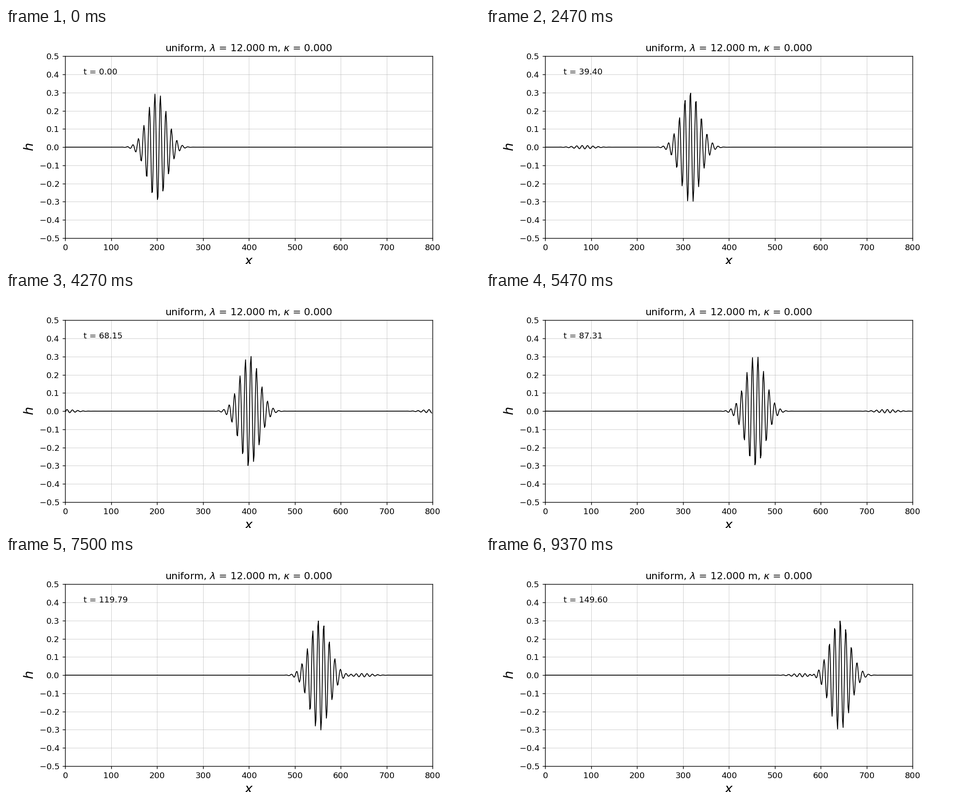
A matplotlib script that plays this animation: 1058x529 px, repeating every 9.41 s.

```python
import numpy as np
import matplotlib.pyplot as plt
from matplotlib.animation import FuncAnimation

LOOP_MS = 9410
SLOTS = 314
SLOT_MS = LOOP_MS / SLOTS

# The wave advances 30 times a second, on a clock of 10 ms
starts = 10 * np.round(np.arange(282) * 10 / 3)

# Periodic domain, values stored at cell centres
LENGTH, CELLS = 800, 600
DX = LENGTH / CELLS
x = (np.arange(CELLS) + 0.5) * DX

# Wave packet
WAVELENGTH, AMPLITUDE = 12.0, 0.3
CENTRE, WIDTH, SHIFT = 200, 30, 0.2
packet = (AMPLITUDE * np.sin(2 * np.pi * (x - SHIFT) / WAVELENGTH)
          * np.exp(-((x - CENTRE) / WIDTH) ** 2))

# Leapfrog scheme on a staggered grid, five steps per picture
C0 = np.sqrt(9.8)        # long-wave speed for unit depth
COURANT = 0.25
DT = COURANT * DX / C0
STEP = 5 * DT

# Its numerical dispersion; excess velocity sends a weak wave to the left
half = np.pi * np.fft.rfftfreq(CELLS)
omega = 2 / DT * np.arcsin(COURANT * np.sin(half))
excess = 1 / np.maximum(np.cos(half), 0.5)
spectrum = np.fft.rfft(packet)
right = spectrum * (1 + excess) / 2
left = spectrum * (1 - excess) / 2


def surface(t):
    turn = np.exp(1j * omega * t)
    return np.fft.irfft(right / turn + left * turn, CELLS)


fig, ax = plt.subplots(figsize=(8, 4), dpi=132.25)
line, = ax.plot(x[:-1], packet[:-1], color="black", lw=1)
clock = ax.text(40, 0.4, "t = 0.00")
ax.set_xlim(0, LENGTH)
ax.set_ylim(-0.5, 0.5)
ax.set_yticks(np.linspace(-0.5, 0.5, 11))
ax.set_xlabel("$x$", fontsize=16)
ax.set_ylabel("$h$", fontsize=16)
ax.set_title(r"uniform, $\lambda$ = 12.000 m, $\kappa$ = 0.000")
ax.grid(lw=0.35)


def update(slot):
    # newest picture that starts before this slot ends
    shown = np.searchsorted(starts, (slot + 1) * SLOT_MS) - 1
    t = shown * STEP
    line.set_ydata(surface(t)[:-1])
    clock.set_text(f"t = {t:.2f}")
    return line, clock


anim = FuncAnimation(fig, update, frames=SLOTS, interval=SLOT_MS,
                     repeat=True, repeat_delay=0)
plt.show()
```
